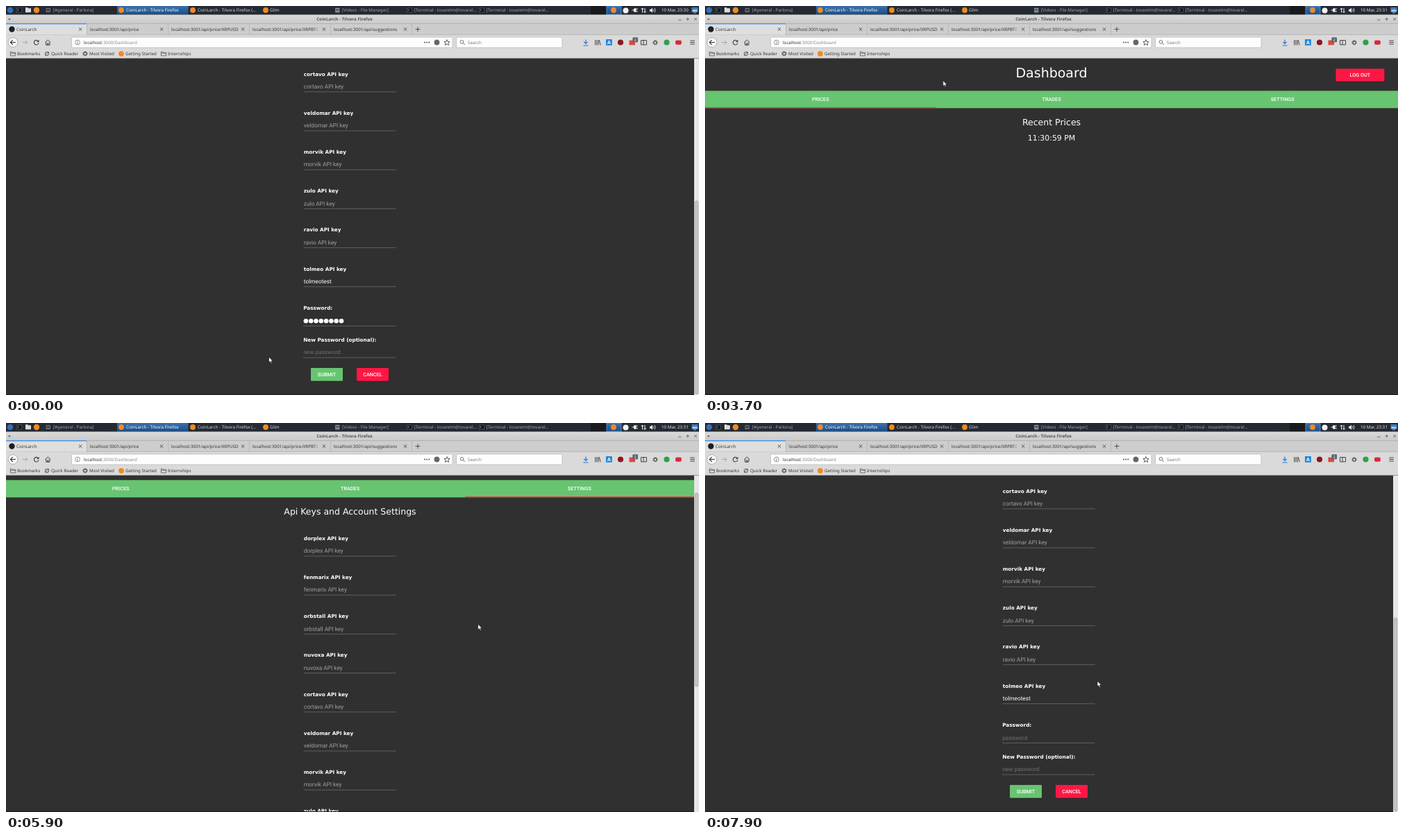
An HTML page that plays this animation: 998 px wide and 561 px high, repeating every 8000 ms.

```html
<!DOCTYPE html>
<html lang="en">
<head>
<meta charset="utf-8">
<title>CoinLarch</title>
<style>
  html, body { margin: 0; width: 100%; height: 100%; overflow: hidden; background: #303030; }
  svg { display: block; width: 998px; height: 561px; }
  text { white-space: pre; text-rendering: geometricPrecision; }
  .ui { font-family: "Noto Sans", sans-serif; }
  .rb { font-family: Roboto, sans-serif; }
  .dj { font-family: "DejaVu Sans", sans-serif; }
</style>
</head>
<body>
<svg viewBox="0 0 998 561" xmlns="http://www.w3.org/2000/svg">
  <defs>
    <clipPath id="view"><rect y="75.5" width="998" height="485.5"/></clipPath>
    <linearGradient id="task" x2="0" y2="1"><stop stop-color="#3a71ab"/><stop offset="1" stop-color="#1f4d85"/></linearGradient>
    <linearGradient id="bar" x2="0" y2="1"><stop stop-color="#dadada"/><stop offset="1" stop-color="#cacaca"/></linearGradient>
    <linearGradient id="fade"><stop stop-color="#cdcdcd" stop-opacity="0"/><stop offset="1" stop-color="#cdcdcd"/></linearGradient>
  </defs>
  <g id="chrome"></g>
  <g id="live"></g>
</svg>
<script>
const LOOP = 8000, STEP = 100;
const RED = '#ff1744', GREEN = '#67c470', DARK = '#303030', INK = '#333', ORANGE = '#f08a24';
const APP = 'CoinLarch', BROWSER = 'Tilvora Firefox';

// y is the middle of the capital letters
const text = (x, y, str, { size = 6.24, cls = 'ui', fill = INK, weight = 400, anchor = 'start' } = {}) =>
  `<text class="${cls}" x="${x}" y="${y + size * .36}" font-size="${size}" font-weight="${weight}" fill="${fill}" text-anchor="${anchor}">${str}</text>`;
const rect = (x, y, w, h, fill, extra = '') => `<rect x="${x}" y="${y}" width="${w}" height="${h}" fill="${fill}" ${extra}/>`;
const disc = (x, y, r, fill, extra = '') => `<circle cx="${x}" cy="${y}" r="${r}" fill="${fill}" ${extra}/>`;
const line = (d, color = '#3c3c3c', width = 1, extra = '') =>
  `<path d="${d}" fill="none" stroke="${color}" stroke-width="${width}" ${extra}/>`;
const roboto = (x, y, str, opts) => text(x, y, str, { cls: 'rb', size: 7.28, weight: 500, fill: '#fff', ...opts });
const dejavu = (x, y, str, opts) => text(x, y, str, { cls: 'dj', fill: '#fff', ...opts });
const mid = { anchor: 'middle' };

const folder = (x, y, color = '#555') => line(`M${x - 3.6} ${y - 2.6}h2.6l1 1h3.6v4.6h-7.2zM${x - 3.6} ${y - .6}h7.2`, color, .8);
const gear = (x, y) => disc(x, y, 2.2, 'none', 'stroke="#444" stroke-width="1.1"') +
  disc(x, y, 3.2, 'none', 'stroke="#444" stroke-width="1" stroke-dasharray="1.2 1.31"');
const terminal = (x, y) => rect(x - 3.6, y - 3, 7.2, 6, '#15181c', 'stroke="#59616a" stroke-width=".6"') +
  line(`M${x - 2.2} ${y - 1.4}l1.3 1.1-1.3 1.1`, '#ddd', .7);

function panel() {
  const dim = '#a2a7ad', bright = '#d6d9dd';
  const tasks = [[68, '[#general - Parlona]', dim], [276, `${APP} - ${BROWSER} (...`, bright], [380, 'Glim', bright],
    [484, '[Videos - File Manager]', dim], [588, '[Terminal - tovarelm@tovarel...', dim], [692, '[Terminal - tovarelm@tovarel...', dim]];
  return rect(0, 0, 998, 12.5, '#252a32') + rect(842, 0, 23, 12.5, '#181a1d') +
    rect(160, 0, 102.5, 12.2, 'url(#task)') + rect(865, 0, 21, 12.2, 'url(#task)', 'stroke="#5ba0e0" stroke-width=".8"') +
    disc(6, 6, 4.2, '#2f6fc0') + terminal(19, 6) +
    rect(28, 3.2, 8, 6, '#d9dde0', 'rx=".8"') + rect(28, 2.2, 3.6, 2, '#d9dde0') +
    disc(44, 6, 4.2, ORANGE) + rect(57.5, 3, 6.5, 6, '#697382', 'rx="1"') + rect(58.5, 4.2, 4.5, 3, '#343b48') +
    [166, 269, 374, 875].map(x => disc(x, 6, 3.9, ORANGE)).join('') +
    rect(474, 2.8, 6.5, 6.6, '#7c8792', 'rx=".6"') + rect(475, 5, 4.5, 1, '#2c333b') +
    terminal(581, 6) + terminal(685, 6) +
    tasks.map(([x, s, fill]) => text(x, 5.8, s, { fill })).join('') +
    disc(892.5, 6.5, 4, '#f2f2f2') +
    line('M901.5 6h3M907 4.2h3M907 7.8h3', '#eee', 1) + rect(904, 3.2, 3.6, 5.6, '#eee', 'rx="1.4"') +
    line('M916.5 9.5v-6.5m-1.8 2l1.8-2 1.8 2M920 3v6.500m-1.8-2l1.8 2 1.8-2', '#eee', 1) +
    '<path d="M927 4.700h1.800l2.200-2v7l-2.200-2h-1.800z" fill="#eee"/>' +
    line('M932.3 4.300q1.300 1.900 0 3.800M934 3q2.300 3.200 0 6.400', '#eee', .8) +
    rect(987.5, 2, 9, 7, '#3d7dc4', 'rx=".6"') + rect(988.5, 5.5, 7, 2.4, '#b8d4ef') + rect(990, 9.3, 4, 1, '#9fb1c4');
}

function tabStrip() {
  const titles = ['', 'price', 'price/XRPUSD', 'price/XRPBTC', 'suggestions'];
  return rect(0, 12.5, 998, 12.7, 'url(#bar)') + rect(0, 25.2, 998, 16, '#cdcdcd') +
    '<path d="M3 18.200h4l-2 2.200z" fill="#555"/>' +
    line('M968 20h4.500M979.500 18.800h4.500M981.750 16.500v4.600M991.300 17l3.800 3.800m0-3.800l-3.800 3.800', '#555', .8) +
    rect(0, 25.2, 116, 16.3, '#dedede') + rect(0, 25, 116, 1.3, '#3a8ee6') +
    titles.map((name, i) => {
      const x = 116.5 + 117 * i;
      return (i ? text(x - 112.5, 33.5, 'localhost:3001/api/' + name) : '') +
        line(`M${x} 26v15`, '#b0b0b0', .7) +
        line(`M${x - 11.6} 31.300l4.400 4.400m0-4.400l-4.400 4.400`, '#444', .9);
    }).join('') +
    rect(443, 28, 9, 11, 'url(#fade)') + line('M589.500 33.500h7m-3.500-3.500v7', '#444', .9);
}

function navBar() {
  const box = 'rx="1.2" stroke="#b3b3b3" stroke-width=".7"';
  return rect(0, 41.2, 998, 34.3, '#dadada') + line('M116 41.200H998', '#b8b8b8', .6) + line('M0 75.300H998', '#a8a8a8', .6) +
    line('M24 52.500h7m-3-3l3 3-3 3', '#a6a6a6', 1) +
    line('M56.500 52.500l3.800-3.600 3.800 3.600M57.700 52.200v4h5.200v-4', '#3c3c3c', 1) + rect(59.5, 53.3, 1.7, 3, '#3c3c3c') +
    rect(94.5, 45, 548.5, 15, '#fdfdfd', box) + rect(648.5, 45, 152.5, 15, '#fdfdfd', box) +
    disc(103, 52.5, 3.4, 'none', 'stroke="#666" stroke-width=".7"') + line('M103 50.500v.9m0 .6v2.600', '#666', .9) +
    text(112, 52.3, 'localhost<tspan fill="#8a8a8a">:3000/Dashboard</tspan>') +
    [602.8, 606, 609.2].map(x => disc(x, 52.5, 1, '#555')).join('') + disc(620.5, 52.5, 3.9, '#666') +
    line('M635 48.600l1.200 2.700 2.900.3-2.200 1.900.7 2.900-2.600-1.500-2.600 1.500.7-2.900-2.200-1.900 2.900-.3z', '#444', .9) +
    disc(656.5, 51.7, 2.3, 'none', 'stroke="#555" stroke-width=".8"') + line('M658.200 53.400l2.600 2.600', '#555', .9) +
    text(665, 52.3, 'Search', { fill: '#777' }) +
    line('M835 48.500v5.800m-2.700-2.700l2.700 2.700 2.700-2.700M831.500 57h7', '#2878d8', 1.2) +
    line('M848.700 49v7.400m2.200-7.400v7.400m2.200-7.400v7.400m1.200-7.300l1.900 7.200', '#444', 1) +
    rect(864, 48, 8.800, 8.800, '#1f87dc') + text(868.4, 52.4, 'A', { fill: '#fff', size: 7, weight: 700, anchor: 'middle' }) +
    disc(885, 52.5, 4.1, '#8a1820') + rect(897.5, 49.5, 8.5, 6.800, '#d84a3f') +
    rect(902.5, 45.3, 7.5, 7, '#58616a', 'rx="1"') + text(906.2, 48.8, '2', { fill: '#fff', size: 5.8, anchor: 'middle' }) +
    line('M914.500 49.500h8v6.400h-8zM918 49.500v6.400', '#444', 1) + gear(935, 52.8) +
    disc(951.5, 52.5, 4.100, '#2fa04c') + rect(964, 49.5, 8.800, 6.200, '#d42b38', 'rx="2"') +
    line('M985.300 50h6.500m-6.500 2.500h6.500m-6.500 2.500h6.500', '#444', 1) +
    folder(10, 68.8) + disc(59, 68.8, 2.700, 'none', 'stroke="#555" stroke-width="1"') + line('M56 71.500l6-5.500', '#555', 1) +
    gear(114, 68.8) + disc(166, 68.8, 3.900, ORANGE) + folder(227, 68.8) +
    [[16, 'Bookmarks'], [65, 'Quick Reader'], [120, 'Most Visited'], [172, 'Getting Started'], [233, 'Internships']]
      .map(([x, s]) => text(x, 68.6, s)).join('');
}

function browserState(t) {
  const loading = t >= 1900 && t < 2600, busy = t >= 1900 && t < 3300;
  const stop = t >= 1700 && t < 3400, hover = t >= 1300 && t < 3400;
  const title = loading ? BROWSER : `${APP} - ${BROWSER}`;
  const back = t >= 1100 && t < 1300;
  const dotX = 8.5 + 4 * Math.sin((t - 2030) / 180);
  return text(173, 5.8, title, { fill: '#fff' }) + text(487.5, 19, title, { weight: 700, fill: '#555', ...mid }) +
    text(944, 5.8, `10 Mar, 23:${t < 3500 ? 30 : 31}`, { fill: '#e6e6e6' }) +
    (busy ? disc(dotX, 33.7, 1.2, loading ? '#777' : '#2f86e0') : disc(8.5, 33.5, 4.2, '#1c1f22')) +
    text(15, 33.5, loading ? 'localhost:3000/Dashboard' : APP) +
    disc(10, 52.5, 7, back ? '#d0d0d0' : '#f6f6f6', 'stroke="#999" stroke-width=".7"') +
    line('M14 52.500h-7.500m3.300-3.300l-3.300 3.300 3.300 3.300', '#333', 1.200) +
    (hover ? rect(37, 45.2, 13.5, 14.6, '#bdbdbd', 'rx="1"') : '') +
    (stop ? line('M40.500 49.500l6 6m0-6l-6 6', '#888', 1)
          : line('M46.300 50.700a3.300 3.300 0 1 0 .6 2.600', '#3c3c3c', 1.100) + '<path d="M47.500 48.700v3.300h-3.300z" fill="#3c3c3c"/>');
}

function status(t) {
  if (t < 1900 || t >= 3200) return '';
  const msg = t < 2400 ? 'Looking up localhost…' : 'Transferring data from localhost…';
  return rect(-1, 550.5, 137.5, 11.5, 'url(#bar)', 'stroke="#a5a5a5" stroke-width=".7"') + text(1.5, 556, msg);
}

const button = (x, y, w, h, label, fill) =>
  rect(x, y + .8, w, h, '#000', 'opacity=".3" rx="1"') + rect(x, y, w, h, fill, 'rx="1"') +
  roboto(x + w / 2, y + h / 2, label, mid);

function header(width, inkX) {
  return dejavu(width / 2, 96, 'Dashboard', { size: 19, ...mid }) +
    button(width - 89.6, 90.6, 70, 18.2, 'LOG OUT', RED) +
    rect(0, 122.3, width, 25, GREEN) +
    ['PRICES', 'TRADES', 'SETTINGS'].map((s, i) => roboto(width * (2 * i + 1) / 6, 134.2, s, mid)).join('') +
    rect(inkX, 146.2, width / 3, 1.1, RED);
}

const PRICES = `dorplex 0.00008918 BTC,dorplex 0.00113065 ETH,dorplex 0.78 USDT,orbstall 0.00008923 BTC,orbstall 0.78166 USD,
morvik 0.00008923 BTC,morvik 0.78031 USD,veldomar 0.00008905 BTC,veldomar 0.7785046 USDT,fenmarix 0.00008894 BTC,
fenmarix 0.7795 USD,wuza 0.00008905 BTC,wuza 0.00113151 ETH`.split(',').map(r => r.trim().split(' '));

function prices(width, t, loaded) {
  const clock = t < 3750 ? '11:30:59' : t < 4750 ? '11:31:00' : '11:31:01';
  const cols = [136, 383.6, 631.8];
  const row = (cells, y, opts) => cells.map((s, i) => roboto(cols[i], y, s, opts)).join('');
  return dejavu(width / 2, 167, 'Recent Prices', { size: 12.5, ...mid }) +
    dejavu(width / 2, 190, clock + ' PM', { size: 10.92, ...mid }) +
    (loaded ? row(['Exchange', 'Price', 'Pair'], 215, { fill: RED }) + line('M123 229.800h744', '#737373', .7) +
      PRICES.map(([name, price, coin], i) => {
        const y = 242.2 + 24.97 * i;
        return row([name, price, 'XRP/' + coin], y, { size: 6.76, weight: 400 }) + line(`M123 ${y + 12.5}h744`, '#737373', .7);
      }).join('') : '');
}

const EXCHANGES = ['dorplex', 'fenmarix', 'orbstall', 'nuvoxa', 'cortavo', 'veldomar', 'morvik', 'zulo', 'ravio', 'tolmeo'];

function settings(filled) {
  const field = (x, y, label, hint, fill) =>
    dejavu(x, y, label, { size: 7.28, weight: 700 }) +
    text(x, y + 18.1, hint, { cls: 'rb', size: 8.32, fill }) + line(`M${x} ${y + 25.8}h133`, '#757575', .7);
  const dots = Array.from({ length: 8 }, (_, i) => disc(431.9 + 7.3 * i, 787.2, 3.3, '#fff')).join('');
  return dejavu(495.5, 167, 'Api Keys and Account Settings', { size: 12.5, ...mid }) +
    EXCHANGES.map((name, i) => {
      const own = name === 'tolmeo';
      return field(428.8, 206.2 + 56.2 * i, name + ' API key', own ? 'tolmeotest' : name + ' API key', own ? '#fff' : '#a0a0a0');
    }).join('') +
    field(428.2, 768.6, 'Password:', filled ? '' : 'password', '#6f6f6f') + (filled ? dots : '') +
    field(428.2, 814.3, 'New Password (optional):', 'new password', '#6f6f6f') +
    button(439, 855, 46, 18.7, 'SUBMIT', GREEN) + button(505, 855, 46, 18.7, 'CANCEL', RED);
}

const track = (points, t) => {
  const i = points.findIndex(p => p[0] > t);
  if (i < 0) return points.at(-1).slice(1);
  const [a, b] = [points[i - 1], points[i]], p = (t - a[0]) / (b[0] - a[0]);
  return a.slice(1).map((v, k) => v + (b[k + 1] - v) * p);
};

const SCROLL = [[0, 333], [2599, 333], [2600, 0], [5800, 0], [5900, 40], [6200, 130], [6500, 238], [6700, 268],
  [6900, 268], [7000, 299], [7200, 325], [7400, 333]];
const POINTER = [[0, 378.5, 506], [400, 230, 300], [900, 41.5, 75], [1150, 16, 58], [1500, 41, 56], [3300, 41, 56],
  [3700, 342.8, 107.5], [4200, 740, 160], [4800, 808, 138], [5000, 808, 138], [5400, 740, 225], [5800, 679.7, 290],
  [6900, 679.7, 290], [7000, 677.5, 291], [7700, 677.5, 291], [7900, 565, 372]];

function scrollbar(top, height) {
  return rect(991, 75.5, 7, 485.5, '#e6e6e6') +
    rect(992.2, top, 4.6, height, '#c3c3c3', 'rx="2.300" stroke="#979797" stroke-width=".6"');
}

function page(t) {
  const [scroll] = track(SCROLL, t);
  const before = t < 2600, onSettings = before || t >= 5100, loaded = t >= 4000;
  const width = before || loaded ? 991 : 998;
  const slide = Math.min(1, Math.max(0, (t - 5000) / 800));
  const inkX = before ? 661 : 661 * (1 - (1 - slide) ** 4);
  const wave = (t - 5000) / 450;
  const ripple = wave > 0 && wave < 1 ? disc(808, 138, 8 + 50 * wave, '#fff', `opacity="${.25 * (1 - wave)}"`) : '';
  const bar = onSettings ? scrollbar(76.5 + scroll * .614, 279) : loaded ? scrollbar(77, 269) : '';
  return `<g clip-path="url(#view)">${rect(0, 75.5, 998, 486, DARK)}<g transform="translate(0 ${-scroll})">` +
    header(width, inkX) + ripple + (onSettings ? settings(before) : prices(width, t, loaded)) +
    `</g>${rect(0, 560.2, width, .8, '#161616')}${bar}</g>`;
}

function pointer(t) {
  const [x, y] = track(POINTER, t);
  const hand = t >= 4400 && t <= 5000;
  const shape = hand
    ? 'M.3 1q.8-.8 1.500 0l.9 2.200 2.600.5q1.300.4 1 2l-.6 3.100h-3.500l-2.500-3.200q-.3-1 .8-.7l.7.500z'
    : 'M0 0v8.200l1.900-1.700 1.300 2.900 1.400-.6-1.300-2.800h2.600z';
  return `<path transform="translate(${hand ? x - 1.5 : x} ${y})" d="${shape}" fill="#fff" stroke="#111" stroke-width=".7"/>`;
}

const live = document.getElementById('live');
document.getElementById('chrome').innerHTML = panel() + tabStrip() + navBar();

let start, shown = -1;
function draw(now) {
  start ??= now;
  const t = Math.floor((now - start) % LOOP / STEP) * STEP;
  if (t !== shown) live.innerHTML = page(t) + browserState(t) + status(t) + pointer(t);
  shown = t;
  requestAnimationFrame(draw);
}
draw(performance.now());
</script>
</body>
</html>
```
